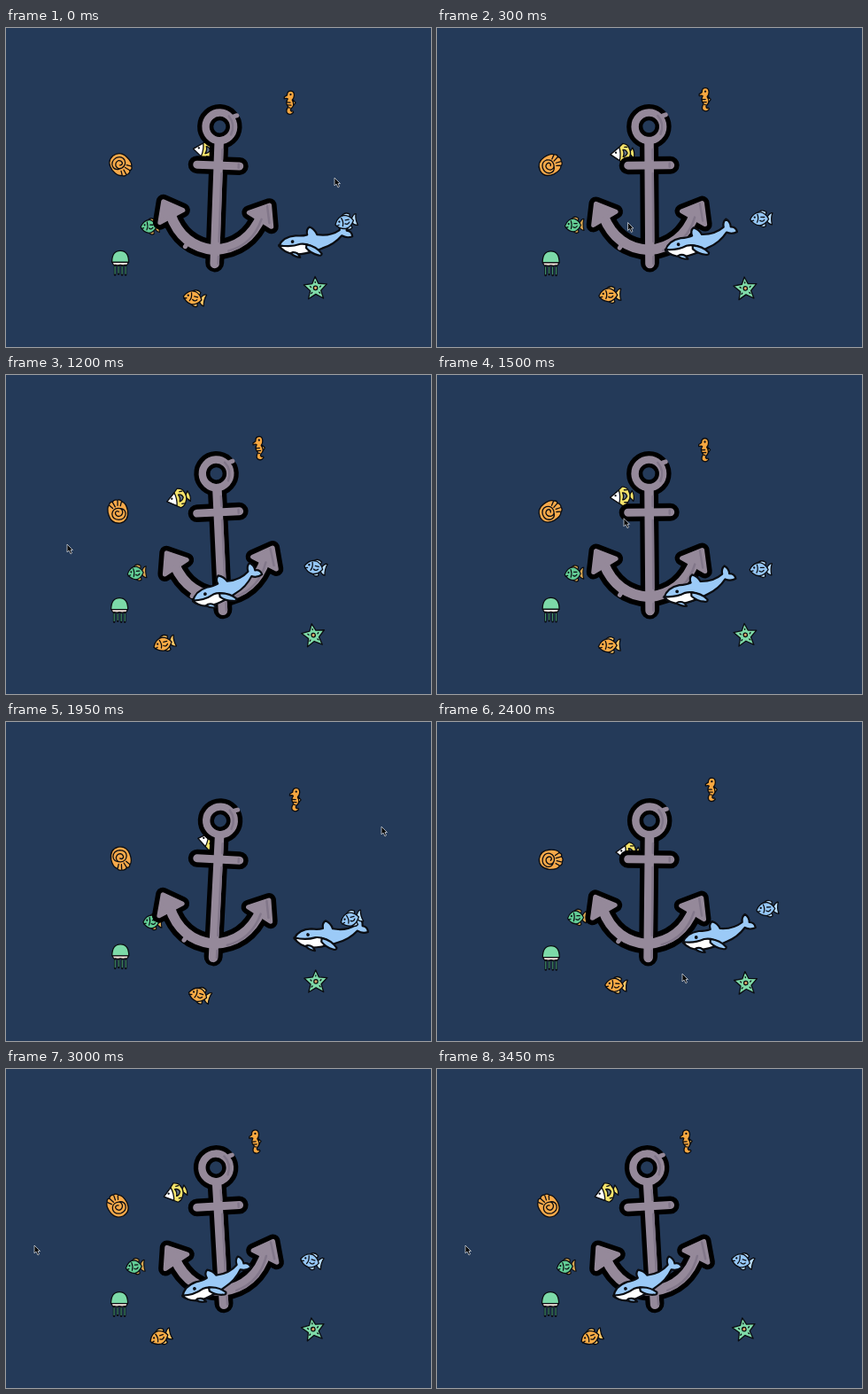
Animation, 480 px wide and 360 px high, one loop 3.6 s. Source, as an HTML page:

```html
<!DOCTYPE html>
<html lang="en">
<head>
<meta charset="utf-8">
<title>Sea parallax</title>
<style>
  html, body { margin: 0; width: 100%; height: 100%; overflow: hidden; background: #243a59; }
  svg { display: block; width: 480px; height: 360px; }
  .ink { stroke: #0b0d12; stroke-width: 1.3; stroke-linejoin: round; stroke-linecap: round; }
  .line { fill: none; }
  .body { fill: var(--body); }
  .fin { fill: var(--fin); }
  #orange { --body: #f9ab45; --fin: #ffc766; }
  #green { --body: #62cc95; --fin: #d9a650; }
  #blue { --body: #95c6f5; --fin: #b8dcfa; }
  #whale { stroke-width: 2.2; }
  #legs { stroke-width: 2.6; }
  #glow { stroke: #52b887; stroke-width: .9; }
  .edge { fill: #000; stroke: #000; stroke-linejoin: round; stroke-linecap: round; }
  .metal { fill: #95899a; stroke: #95899a; stroke-linejoin: round; stroke-linecap: round; }
  .shade { fill: none; stroke: #82778a; stroke-linecap: round; }
</style>
</head>
<body>
<svg viewBox="0 0 480 360">
  <defs>
    <g id="fish" class="ink">
      <path class="fin" d="M-4-6Q0-12 6-8L5-3ZM-2 6Q2 11 6 8L5 3Z"/>
      <path class="fin" d="M6 0Q10-8 13-7Q11-1 13 6Q9 6 6 1Z"/>
      <path class="body" d="M-12 1Q-8-8 0-7.500Q6-6 9 0Q5 7-1 7.500Q-8 7-12 1Z"/>
      <path class="line" d="M-4-5Q-2 0-4 4M0-2H4M-1 2Q2 4 4 1M-11 3L-8 2"/>
      <circle cx="-7" cy="-1.500" r=".5" fill="#0b0d12"/>
    </g>
    <path id="arms" d="M187 212Q201 248 238 250.500Q276 247 290 210" fill="none"/>
    <path id="flukes" d="M178.500 198L175.500 222L201 207ZM298.500 198L301.500 222L275.500 207Z"/>
  </defs>

  <g id="yellow" class="ink">
    <path fill="#f5e36a" d="M8 0L12-6Q15 0 13 6Z"/>
    <path fill="#f5e36a" d="M-13 1Q-5-5 1-11Q7-10 8-6Q11 0 8 5Q6 10 1 11Q-6 6-13 1Z"/>
    <path fill="#fff" d="M-13 1L-3-7Q-1 0-3 8Z"/>
    <path fill="#65758a" d="M1-4Q5-4 6 0Q4 4 1 4Q3 0 1-4Z"/>
    <path class="line" d="M3-7H6M3 7H6"/>
    <circle cx="-7" cy="-1" r=".5" fill="#0b0d12"/>
  </g>

  <g id="green"><use href="#fish" transform="scale(.86 .98)"/></g>

  <g id="anchor"><g transform="translate(-238.500 -156)">
    <g class="edge">
      <circle cx="239" cy="111.300" r="18" fill="none" stroke-width="14.500"/>
      <path d="M239 133V265" stroke-width="21"/>
      <path d="M215 155H263" stroke-width="20"/>
      <use href="#arms" stroke-width="23"/>
      <use href="#flukes" stroke-width="16"/>
    </g>
    <g class="metal">
      <circle cx="239" cy="111.300" r="15.500" fill="none" stroke-width="9"/>
      <path d="M239 130V266" stroke-width="10.500"/>
      <path d="M215 155H263" stroke-width="9"/>
      <use href="#arms" stroke-width="11.500"/>
      <use href="#flukes" stroke-width="5"/>
      <path d="M255 99L258 98M207 245L205 248" stroke-width="5"/>
    </g>
    <g class="shade" stroke-width="2.500">
      <path d="M243 137V148M243 164V241M262 153V157M243 258V266"/>
      <path d="M249 99Q257 108 252 120M254 251Q281 243 290 214M296 199L299 218"/>
    </g>
    <circle cx="239" cy="111.300" r="9.300" fill="none" stroke="#000" stroke-width="4.500"/>
  </g></g>

  <g id="whale" class="ink">
    <path fill="#9bcaf7" d="M-40 9Q-36-2-22-4Q-14-4-9-6Q-11-12-7-15Q-1-13 2-7Q17-6 27-14Q26-20 30-23Q35-20 35-14Q41-14 42-8Q36-5 30-8Q22 3 9 8Q-4 15-20 16Q-34 16-40 9Z"/>
    <path fill="#fff" d="M-40 8Q-27 10-16 5Q-7 3 3 10Q-9 16-20 17Q-34 17-40 8Z"/>
    <path fill="#9bcaf7" d="M-9 5Q2 6 9 14Q9 17 5 16Q-3 15-9 9Z"/>
    <path fill="#9bcaf7" d="M-24 15Q-18 14-15 20Q-22 20-26 16Z"/>
    <circle cx="-25" cy="3" r=".8" fill="#0b0d12"/>
  </g>

  <g id="seahorse" class="ink">
    <path fill="#ffc766" d="M4-3L7 0L4 4Z"/>
    <path fill="#f7a740" d="M-6-6L-3-8Q-3-13 1-13Q5-13 5-8Q5-5 3-3Q7 3 2 7Q1 9 3 10Q5 9 5 11Q2 15-2 12Q-4 9-1 5Q-5 1-2-4Q-3-5-6-4Z"/>
    <path class="line" d="M-3 0H1M-2 3H2M0 6H1"/>
    <circle cx="1" cy="-9" r=".5" fill="#0b0d12"/>
  </g>

  <g id="shell" class="ink">
    <path fill="#f7a94a" d="M-2-11Q7-12 10-8Q13-7 12-4Q15-1 13 2Q14 5 10 7Q8 11-1 11Q-13 10-13 0Q-12-10-2-11Z"/>
    <path class="line" d="M3 4Q1 9-4 8Q-10 6-9-1Q-7-8-1-7Q5-5 4 1Q3 6-2 5Q-6 3-5-1Q-3-4 0-3Q2-1 0 1"/>
    <path class="line" d="M5-5L9-8M6-2L12-4M7 1L12 2M6 4L10 6"/>
  </g>

  <g id="jelly" class="ink">
    <path id="legs" class="line" d="M-6 3V13M-2 3V12M2 3V13M6 3V13"/>
    <path id="glow" class="line" d="M-6 4V12M-2 4V11M2 4V12M6 4V12"/>
    <path fill="#7cdaa8" d="M-9.500-1Q-9.500-14 0-14Q9.500-14 9.500-1Z"/>
    <path fill="#f4e4dc" d="M-9-1H9Q8 3 6 2Q3 3 0 2Q-3 3-6 2Q-8 3-9-1Z"/>
  </g>

  <g id="star" class="ink">
    <path fill="#7edaa8" d="M0-13L3.500-5L13-4L6 3L8.500 12L0 7L-8.500 12L-6 3L-13-4L-3.500-5Z"/>
    <circle r="2.200" fill="#d8a566"/>
    <path class="line" d="M0-7V-6M6-2L5-1M4 5L5 6M-4 5L-5 6M-6-2L-5-1"/>
  </g>

  <g id="orange"><use href="#fish"/></g>
  <g id="blue"><use href="#fish"/></g>

  <path id="cursor" fill="#080808" stroke="#c9ced6" stroke-width=".8" d="M0 1V10L2 8L4 12L5.500 11L4 7.500H6.500Z"/>
</svg>
<script>
  const LOOP = 3600, STEP = 150;

  // Pointer path: time, x, y
  const path = [
    [0, 371, 168], [600, 60, 269], [1200, 69, 190], [1950, 424, 117],
    [2400, 277, 283], [2550, 200, 345], [2700, 120, 345], [2850, 60, 283],
    [3000, 32, 198], [LOOP, 32, 198]
  ];

  // Rest x, y; shift per pointer x, y; rest angle, turn per pointer x
  const layers = {
    yellow: [211.5, 138.4, .1, .08, 0, .07],
    green: [156, 223.7, .05, -.03, 0, .02],
    anchor: [239.2, 156, 0, 0, 0, .016],
    whale: [305.5, 240, .33, 0, -1.7, .046],
    seahorse: [305, 83.2, .115, -.068, 0, .02],
    shell: [128, 154.3, .009, .01, -16, .5],
    jelly: [128.7, 265.5, .003, .01, 0, 0],
    star: [348.5, 293.5, .008, .01, -5, .02],
    orange: [197.5, 304, .112, -.068, 2, .095],
    blue: [368.5, 218, .115, -.068, 0, -.08]
  };

  const $ = id => document.getElementById(id);
  const place = (id, x, y, angle = 0) =>
    $(id).setAttribute('transform', `translate(${x} ${y}) rotate(${angle})`);

  function pointer(t) {
    const i = path.findIndex(p => p[0] > t);
    const [t0, x0, y0] = path[i - 1], [t1, x1, y1] = path[i];
    const k = (t - t0) / (t1 - t0);
    return [x0 + (x1 - x0) * k, y0 + (y1 - y0) * k];
  }

  function draw(now) {
    const t = Math.floor((now % LOOP) / STEP) * STEP;
    const [x, y] = pointer(t);
    const u = x - 240, v = y - 180;
    for (const [id, [cx, cy, sx, sy, angle, turn]] of Object.entries(layers)) {
      place(id, cx + sx * u, cy + sy * v, angle + turn * u);
    }
    place('cursor', x, y);
  }

  const start = performance.now();
  function tick() {
    draw(performance.now() - start);
    requestAnimationFrame(tick);
  }
  tick();
</script>
</body>
</html>
```
